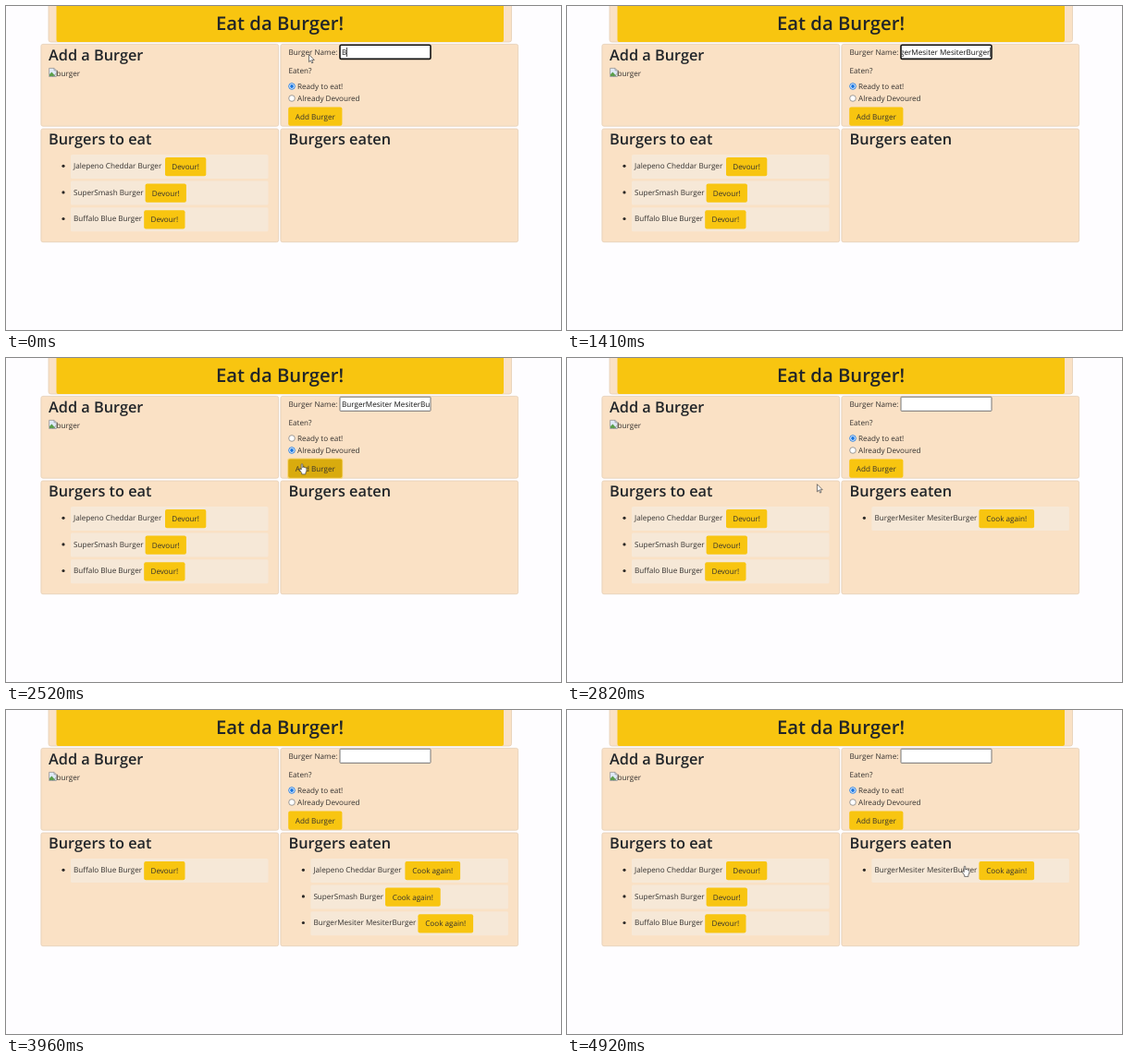
Write an HTML page that moves like this. It is 600 px wide and 351 px high and loops after 4950 ms.

```html
<!DOCTYPE html>
<html lang="en">
<head>
<meta charset="utf-8">
<title>Eat da Burger!</title>
<style>
  html, body { margin: 0; width: 100%; height: 100%; overflow: hidden; background: #fefdff; }
  svg { display: block; width: 600px; height: 351px; }
  text { font: 8.15px "Open Sans", "Noto Sans", sans-serif; fill: #33302e; text-rendering: geometricPrecision; white-space: pre; }
  .h1, .h2 { font-weight: 600; fill: #212529; }
  .h1 { font-size: 20.3px; }
  .h2 { font-size: 16.3px; }
  .mid { text-anchor: middle; }
  .panel { fill: #fae1c5; stroke: #e5cfb5; stroke-width: .8; }
  .row { fill: #f6e8d7; }
  .btn { fill: #f8c510; }
  .btn.hover { fill: #d9ab0e; }
  .typed { fill: #111; }
  .ring { fill: #fff; stroke: #767676; stroke-width: .7; }
  .ring.on { stroke: #1674e0; stroke-width: .9; }
  .dot { fill: #1674e0; }
  .cursor { fill: #fff; stroke: #333; stroke-width: .65; stroke-linejoin: round; }
</style>
</head>
<body>
<svg viewBox="0 0 600 351">
  <defs><clipPath id="inputClip"><rect x="362" y="42" width="96" height="16"/></clipPath></defs>

  <rect class="panel" x="46" y="-4" width="500.5" height="43" rx="2.5"/>
  <rect class="btn" x="54.5" y="-4" width="483.5" height="43" rx="2"/>
  <text class="h1 mid" x="296" y="25.8">Eat da Burger!</text>

  <rect class="panel" x="37.9" y="41.4" width="256.7" height="88.8" rx="2"/>
  <rect class="panel" x="296.9" y="41.4" width="256.7" height="88.8" rx="2"/>
  <rect class="panel lower" x="37.9" y="133" width="256.7" rx="2"/>
  <rect class="panel lower" x="296.9" y="133" width="256.7" rx="2"/>
  <text class="h2" x="46" y="59">Add a Burger</text>
  <text class="h2" x="46" y="150.3">Burgers to eat</text>
  <text class="h2" x="305.5" y="150.3">Burgers eaten</text>

  <!-- missing picture -->
  <path d="M46.6 67.4h5.4l2.4 2.4v6.7h-7.8z" fill="#dfe9f7" stroke="#8d8d8d" stroke-width=".7"/>
  <path d="M47 76v-2l2.4-2.6 4 4.6z" fill="#5a9e4b"/>
  <path d="M52 67.4v2.4h2.4M50.5 76.5l4-3.5" fill="none" stroke="#8d8d8d" stroke-width=".7"/>
  <text x="54.6" y="76.3">burger</text>

  <text x="305.5" y="52.8">Burger Name:</text>
  <rect id="field" x="361" y="42.2" width="98" height="15.2" fill="#fff"/>
  <g clip-path="url(#inputClip)">
    <text id="typed" class="typed" y="52.8"></text>
    <rect id="caret" y="45" width=".7" height="10" fill="#000"/>
  </g>
  <text x="305.5" y="73">Eaten?</text>
  <circle class="ring" cx="309" cy="87" r="3.3"/>
  <circle class="ring" cx="309" cy="100" r="3.3"/>
  <circle id="dot" class="dot" cx="309" r="1.9"/>
  <text x="315" y="90.2">Ready to eat!</text>
  <text x="315" y="103.2">Already Devoured</text>
  <rect id="glow" x="304.2" y="108.4" width="60" height="22.4" rx="2.6" fill="#f8d04d" opacity=".7"/>
  <rect id="add" class="btn" x="305.2" y="109.5" width="58.2" height="20.2" rx="2"/>
  <text class="mid" x="334.3" y="122.8">Add Burger</text>

  <g id="lists"></g>

  <path id="arrow" class="cursor" d="M0 0v8.2l1.9-1.8 1.3 3 1.3-.6-1.3-2.8h2.6z"/>
  <path id="hand" class="cursor" d="M-.8 .6q.8-1.2 1.6 0v3.6l.3-.6q.9-.5 1.3.4.9-.5 1.3.5 1-.4 1.2.7v2.6l-1 2v1.6h-4.2v-1.4l-2.3-3.2q-.5-1.4.8-1.2l1 1z"/>
</svg>
<script>
const LOOP = 4950, STEP = 30;
const NAME = "BurgerMesiter MesiterBurger";
const SUBMIT = 2580, RADIO = 2250, PRESS = 2460;

// offset = start of the button, measured from the label
const BURGERS = {
  j: { name: "Jalepeno Cheddar Burger", offset: 99 },
  s: { name: "SuperSmash Burger", offset: 77.6 },
  b: { name: "Buffalo Blue Burger", offset: 76.2 },
  m: { name: NAME, offset: 113 }
};

// [start, to eat, eaten]
const STATES = [
  [0, "jsb", ""], [SUBMIT, "jsb", "m"], [3270, "sb", "jm"],
  [3870, "b", "jsm"], [4350, "jb", "sm"], [4740, "jsb", "m"]
];

// [time, x, y, shape]; the shape holds until the next stop
const PATH = [
  [0, 327.5, 52.5, "arrow"], [150, 327.5, 52.5, ""], [2010, 338, 66, "arrow"],
  [2190, 309, 99, "arrow"], [2310, 309, 99, "arrow"], [2430, 320, 114.5, "hand"],
  [2730, 320, 114.5, "arrow"], [2940, 194, 171, "hand"], [3090, 194, 171, "arrow"],
  [3270, 323, 217, "arrow"], [3360, 315, 214, "arrow"], [3600, 173, 171, "hand"],
  [3900, 173, 171, ""], [4020, 330, 190, "arrow"], [4170, 434, 170, "hand"],
  [4500, 434, 170, "hand"], [4800, 430, 169, "hand"], [LOOP, 430, 169, "hand"]
];

const $ = id => document.getElementById(id);
const show = (el, on) => el.setAttribute("visibility", on ? "visible" : "hidden");
const set = (el, attrs) => { for (const k in attrs) el.setAttribute(k, attrs[k]); };
const rings = document.querySelectorAll(".ring");
const lower = document.querySelectorAll(".lower");
let drawn = "";

function pointerAt(t) {
  const i = PATH.findLastIndex(p => p[0] <= t);
  const a = PATH[i], b = PATH[i + 1];
  const k = (t - a[0]) / (b[0] - a[0]);
  const ease = k * k * (3 - 2 * k);
  return { x: a[1] + (b[1] - a[1]) * ease, y: a[2] + (b[2] - a[2]) * ease, shape: a[3] };
}

const over = (p, x, y, w, h) =>
  p.shape === "hand" && p.x >= x && p.x <= x + w && p.y >= y && p.y <= y + h;

function listMarkup(keys, x, label, width, p) {
  return [...keys].map((key, i) => {
    const { name, offset } = BURGERS[key];
    const y = 161 + i * 28.6, bx = x + offset;
    const hover = over(p, bx, y + 3, width, 20) ? " hover" : "";
    return `<rect class="row" x="${x - 3}" y="${y}" width="213.5" height="26" rx="1.5"/>
      <circle cx="${x - 11}" cy="${y + 12.3}" r="1.6" fill="#2b2826"/>
      <text x="${x}" y="${y + 15}">${name}</text>
      <rect class="btn${hover}" x="${bx}" y="${y + 3}" width="${width}" height="20.2" rx="2"/>
      <text class="mid" x="${bx + width / 2}" y="${y + 16.2}">${label}</text>`;
  }).join("");
}

function drawForm(t, p) {
  const focus = t < RADIO;
  set($("field"), focus
    ? { stroke: "#111", "stroke-width": 1.6, rx: 1.4 }
    : { stroke: "#767676", "stroke-width": 1, rx: .6 });

  const count = t < SUBMIT ? Math.min(NAME.length, 1 + Math.floor((t + 5) / 51)) : 0;
  const typed = $("typed");
  typed.textContent = NAME.slice(0, count);
  const width = count ? typed.getComputedTextLength() : 0;
  const x = focus ? Math.min(363, 457.4 - width) : 363;
  set(typed, { x });
  set($("caret"), { x: x + width });
  show($("caret"), focus && (t < 1450 || (t - 1450) % 700 < 350));

  const devoured = t >= RADIO && t < SUBMIT;
  rings[0].classList.toggle("on", !devoured);
  rings[1].classList.toggle("on", devoured);
  set($("dot"), { cy: devoured ? 100 : 87 });
  show($("glow"), t >= PRESS && t < SUBMIT);
  $("add").classList.toggle("hover", over(p, 305, 109, 58, 21));
}

function drawLists(t, p) {
  const [, eat, eaten] = STATES.findLast(s => s[0] <= t);
  const rows = Math.max(eat.length, eaten.length);
  lower.forEach(el => set(el, { height: 36.9 + rows * 28.6 }));
  const markup = listMarkup(eat, 73, "Devour!", 44.3, p)
    + listMarkup(eaten, 332.4, "Cook again!", 59.7, p);
  if (markup !== drawn) $("lists").innerHTML = drawn = markup;
}

function render(now) {
  const t = Math.floor(now % LOOP / STEP) * STEP;
  const p = pointerAt(t);
  drawForm(t, p);
  drawLists(t, p);
  for (const shape of ["arrow", "hand"]) {
    show($(shape), p.shape === shape);
    set($(shape), { transform: `translate(${p.x} ${p.y})` });
  }
}

let start;
function tick(now) {
  start ??= now;
  render(Math.max(0, now - start));
  requestAnimationFrame(tick);
}
render(0);
requestAnimationFrame(tick);
</script>
</body>
</html>
```
